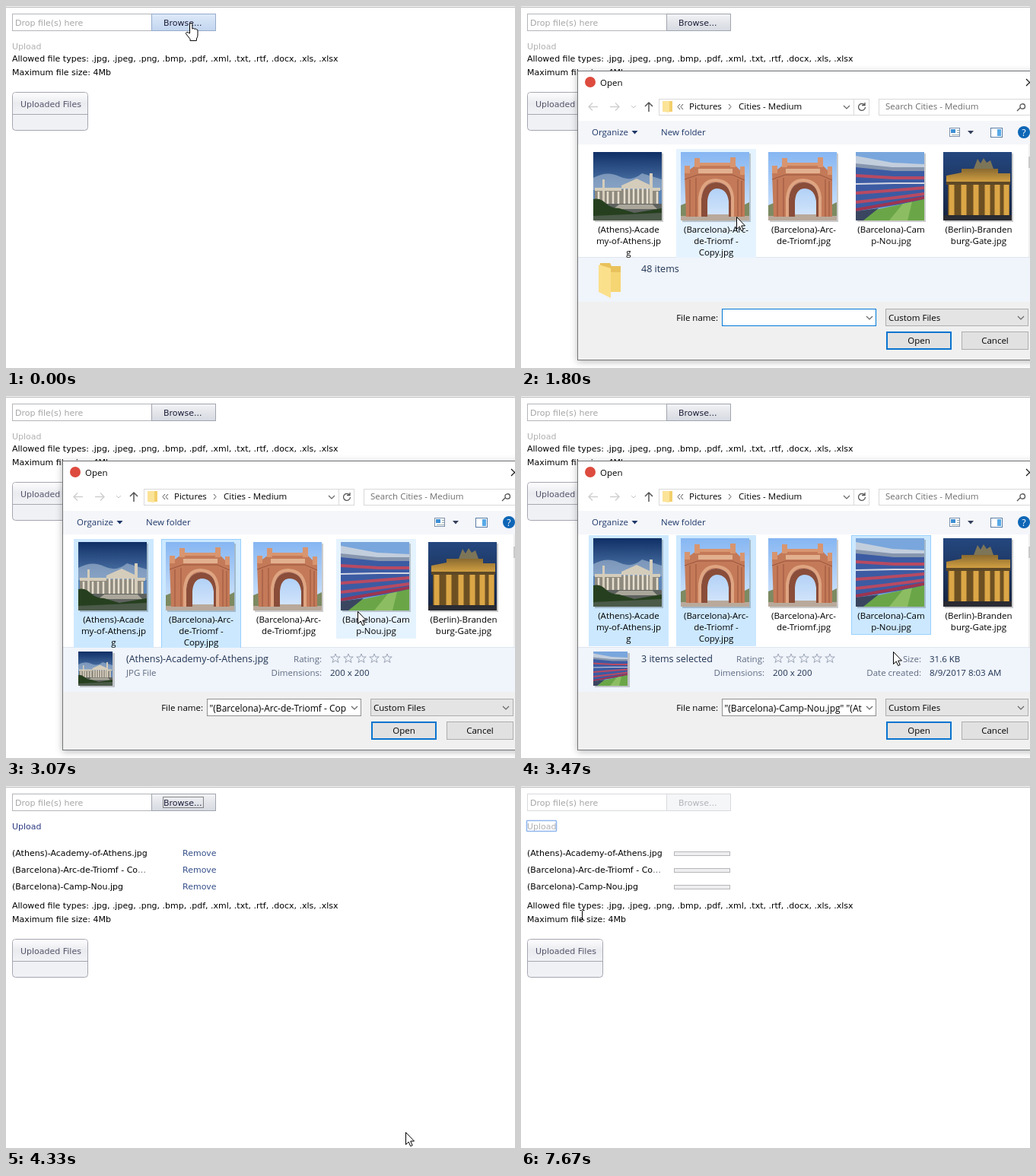
Recreate the animation shown at these times as an HTML page. Size 669 by 476 pixels, loop 8 s.

```html
<!DOCTYPE html>
<html lang="en">
<head>
<meta charset="utf-8">
<title>File upload</title>
<style>
  html, body { margin: 0; width: 100%; height: 100%; overflow: hidden; background: #fff; }
  svg { display: block; }
  text { font: 11px "DejaVu Sans", Verdana, sans-serif; white-space: pre; }
  .dialog text { font: 11.5px "Open Sans", "Segoe UI", sans-serif; }
  .dialog .input { font-size: 12px; }
  .dialog .big { font-size: 12.5px; }
  .mid { text-anchor: middle; }
  .end { text-anchor: end; }
</style>
</head>
<body>
<svg width="669" height="476" viewBox="0 0 669 476">
  <defs>
    <linearGradient id="normal" x2="0" y2="1"><stop stop-color="#f3f4f7"/><stop offset=".5" stop-color="#e3e5ea"/><stop offset="1" stop-color="#d7dae1"/></linearGradient>
    <linearGradient id="hover" x2="0" y2="1"><stop stop-color="#dfeafa"/><stop offset=".5" stop-color="#cfdff4"/><stop offset="1" stop-color="#c3d6f0"/></linearGradient>
    <linearGradient id="header" x2="0" y2="1"><stop stop-color="#fdfdfe"/><stop offset=".5" stop-color="#eaebef"/><stop offset="1" stop-color="#f1f2f5"/></linearGradient>
    <linearGradient id="deepSky" x2="0" y2="1"><stop stop-color="#0f2f66"/><stop offset=".6" stop-color="#5d86b8"/></linearGradient>
    <linearGradient id="daySky" x2="0" y2="1"><stop stop-color="#86b6f2"/><stop offset="1" stop-color="#d8e8fb"/></linearGradient>
    <linearGradient id="duskSky" x2="0" y2="1"><stop stop-color="#24477f"/><stop offset="1" stop-color="#16233f"/></linearGradient>
    <linearGradient id="gold" x2="0" y2="1"><stop stop-color="#8a6a30"/><stop offset="1" stop-color="#d9a544"/></linearGradient>
    <clipPath id="list"><path d="M76 182H669V331H76Z"/></clipPath>
    <clipPath id="square"><path d="M0 0H90V90H0Z"/></clipPath>

    <g id="photo0" clip-path="url(#square)">
      <path fill="url(#deepSky)" d="M0 0H90V90H0Z"/>
      <path fill="#a9bdd4" d="M0 34Q18 24 34 32T64 28L90 36V50H0Z" opacity=".6"/>
      <path fill="#8f8a7e" d="M2 49H86V70H2Z"/>
      <path fill="#d5cdbb" d="M37 44 57 35 76 44V48H37ZM2 47H37V51H2ZM76 47H88V51H76ZM74 28H78V68H74ZM12 36H15V68H12Z"/>
      <path stroke="#e6dfcf" stroke-width="2.500" d="M7 52V68M19 52V68M26 52V68M33 52V68M41 48V69M47 48V69M53 48V69M59 48V69M65 48V69M71 48V69M84 52V68"/>
      <path fill="#5e625f" d="M0 68H90V90H0Z"/>
      <path fill="#aaa69a" d="M34 69H78L84 75H26Z"/>
      <path fill="#26401f" d="M0 62Q9 60 16 67T34 74L54 80 90 74V90H0Z"/>
      <path fill="#4b5a49" d="M0 84 90 80V90H0Z"/>
    </g>
    <g id="photo1" clip-path="url(#square)">
      <path fill="url(#daySky)" d="M0 0H90V90H0Z"/>
      <path fill="#b9a99b" d="M0 82H90V90H0Z"/>
      <path fill="#7d8a62" d="M0 70 10 66V84H0ZM82 70 90 66V84H82Z"/>
      <path fill="#c47a58" d="M5 28 20 17 70 16 84 30V85H67V62Q64 40 46 40 29 41 27 62V85H7Z"/>
      <path fill="#d8956f" d="M5 18H12V28H5ZM18 8H25V20H18ZM65 7H72V20H65ZM78 19H84V30H78ZM20 14H70V18H20Z"/>
      <path fill="#8a4d39" d="M27 85V62Q29 41 46 40 64 40 67 62V85H63V65Q61 48 47 48 36 49 35 65V85Z"/>
      <path fill="none" stroke="#dfa582" stroke-width="4" d="M25 85V60Q28 37 46 37 66 38 68 60V85"/>
      <path fill="none" stroke="#99553f" d="M5 36 22 30H68L84 37M12 36V85M20 34V85M75 36V85M80 38V85"/>
      <path fill="#e2b08f" d="M23 22H68V28H23Z"/>
    </g>
    <use id="photo2" href="#photo1"/>
    <g id="photo3" clip-path="url(#square)">
      <path fill="#79a6dc" d="M0 0H90V90H0Z"/>
      <path fill="#c3cedd" d="M0 5 48 14 90 16V24H0Z"/>
      <path fill="#8796ae" d="M0 15 48 20 90 20V26H0Z"/>
      <path fill="#3c5ba3" d="M0 20 50 25 90 25V64L0 78Z"/>
      <path fill="none" stroke="#b84a62" stroke-width="4" d="M0 31 50 34H90M0 54Q46 51 90 47M0 66Q46 61 90 55"/>
      <path fill="none" stroke="#d5d6e2" stroke-width="2" d="M0 42 50 41H90"/>
      <path fill="none" stroke="#9d3551" stroke-width="4" d="M0 76Q46 68 90 60"/>
      <path fill="#6aa648" d="M8 90 26 76 90 62V90Z"/>
      <path fill="#8dbd62" d="M44 90 62 68 74 65.500 68 90Z"/>
      <path fill="#3a4660" d="M0 78 30 74 10 90H0Z"/>
    </g>
    <g id="photo4" clip-path="url(#square)">
      <path fill="url(#duskSky)" d="M0 0H90V90H0Z"/>
      <path fill="#7d7558" d="M40 22 45 9 49 15 53 8 57 14 62 11 66 22Z"/>
      <path fill="url(#gold)" d="M24 22H72V28H88V41H4V31L24 27Z"/>
      <path fill="#5d4826" d="M4 39H88V43H4Z"/>
      <path fill="#6d5022" d="M6 43H87V84H6Z"/>
      <path stroke="#dba646" stroke-width="7" d="M11 43V85M27 43V85M43 43V85M58 43V85M71 43V85M83 43V85"/>
      <path fill="#2a2b33" d="M0 83H90V90H0Z"/>
    </g>
    <g id="folder">
      <path fill="#e9c25c" d="M2 0H15L17 4H29V38H2Z"/>
      <path fill="#fbe08c" d="M0 2 16 7V46L0 38Z"/>
      <path fill="#f6d573" d="M16 12H29V38H16Z"/>
    </g>
    <path id="star" fill="none" stroke="#9ba5b4" d="M0-6 1.6-2H6.2L2.6 1 4 5.4 0 2.8-4 5.4-2.6 1-6.2-2H-1.6Z"/>
    <path id="arrow" fill="#fff" stroke="#000" d="M.5.5V16.5L4.2 13 6.7 18.6 9.2 17.5 6.7 12H11.5Z"/>
    <path id="hand" fill="#fff" stroke="#000" d="M-1.5 13V1.2a1.7 1.7 0 0 1 3.4 0V7q1.6-1.2 3 .3 1.6-.9 2.6.6 1.5-.3 1.5 2V15q0 3-1.6 5V22.6H-1V20.5L-6.3 13.8q-.6-2 .8-2.3Q-4 11-1.5 13Z"/>
    <path id="ibeam" fill="none" stroke="#000" d="M-2.5-6.5H-.5L.5-5.5 1.5-6.5H3.5M.5-5.5V5.5M-2.5 6.5H-.5L.5 5.5 1.5 6.5H3.5"/>
  </defs>
  <g id="scene"></g>
</svg>
<script>
const LOOP = 8000, TICK = 1000 / 15;
const scene = document.getElementById('scene');

const text = (x, y, s, fill = '#000', cls = '') =>
  `<text x="${x}" y="${y}" fill="${fill}" class="${cls}">${s}</text>`;
const box = (x, y, w, h, fill, stroke, extra = '') => stroke
  ? `<rect x="${x + .5}" y="${y + .5}" width="${w - 1}" height="${h - 1}" fill="${fill}" stroke="${stroke}" ${extra}/>`
  : `<rect x="${x}" y="${y}" width="${w}" height="${h}" fill="${fill}" ${extra}/>`;
const line = (d, stroke = '#555', width = 1) =>
  `<path d="${d}" fill="none" stroke="${stroke}" stroke-width="${width}"/>`;
const shape = (d, fill) => `<path d="${d}" fill="${fill}"/>`;
const use = (id, x, y, scale = 1) =>
  `<use href="#${id}" transform="translate(${x} ${y}) scale(${scale})"/>`;
const chevron = (x, y) => line(`M${x - 4} ${y - 2}l4 4 4-4`, '#666', 1.2);

// Pointer path: tick, x, y; eased between points
const pointerPath = [
  [0, 243, 23], [15, 243, 23], [16, 246, 27], [20, 246, 27], [27, 283, 277], [28, 283, 277],
  [33, 150, 262], [37, 150, 262], [41, 255, 270], [43, 255, 270], [46, 462, 283], [50, 468, 276],
  [55, 529, 447], [58, 529, 447], [62, 529, 452], [65, 525, 455], [68, 525, 455], [74, 506, 441],
  [96, 506, 441], [107, 22, 59], [111, 22, 59], [115, 80, 170], [120, 80, 170]
];
function pointerAt(k) {
  const i = pointerPath.findIndex(p => p[0] > k);
  const [k0, x0, y0] = pointerPath[i - 1], [k1, x1, y1] = pointerPath[i];
  const u = (k - k0) / (k1 - k0), e = u * u * (3 - 2 * u);
  return [Math.round(x0 + (x1 - x0) * e), Math.round(y0 + (y1 - y0) * e)];
}
function pointer(k, [x, y]) {
  const kind = k < 16 || (k >= 106 && k < 112) ? 'hand' : k >= 114 ? 'ibeam' : 'arrow';
  return use(kind, x, y);
}

function page(k) {
  const chosen = k >= 65, busy = k >= 112, dy = chosen ? 88 : 0;
  const button = busy ? '#f5f6f8' : k < 13 ? 'url(#hover)' : k < 14 ? '#bccfe9' : 'url(#normal)';
  const edge = busy ? '#d9dadd' : k < 14 ? '#95abcb' : '#a0a4ad';
  let s = box(0, 1, 669, 1, '#b2b2b2')
    + box(8, 10, 184, 23, '#fff', busy ? '#d9dadd' : '#b4b5ba')
    + text(12, 26, 'Drop file(s) here', '#a6a6a8')
    + box(191, 10, 85, 23, button, edge)
    + text(207, 26, 'Browse...', busy ? '#b3b3b8' : '#1d1d38')
    + text(8, 57, 'Upload', chosen && !busy ? '#2c3a80' : '#b0b0b3');
  if (chosen && k < 107) s += box(206, 14, 54, 15, 'none', '#222', 'stroke-dasharray="1 1"');
  if (k >= 109) s += box(7, 45, 40, 15, 'none', '#8fb6ee', 'rx="1" stroke-width="1.6"');
  if (chosen) ['(Athens)-Academy-of-Athens.jpg', '(Barcelona)-Arc-de-Triomf - Co<tspan fill="#667">…</tspan>', '(Barcelona)-Camp-Nou.jpg']
    .forEach((name, i) => {
      const y = 92 + 22 * i;
      s += text(8, y, name)
        + (busy ? box(201, y - 6, 74, 6, '#eeeef0', '#b7b7bb') : text(232, y, 'Remove', '#36508a'));
    });
  return s + text(8, 73 + dy, 'Allowed file types: .jpg, .jpeg, .png, .bmp, .pdf, .xml, .txt, .rtf, .docx, .xls, .xlsx')
    + text(8, 91 + dy, 'Maximum file size: 4Mb')
    + `<g transform="translate(0 ${dy})">`
    + box(8, 113, 100, 51, '#f0f1f5', '#a5a6b0', 'rx="4"')
    + shape('M9 142V118Q9 114 13 114H103Q107 114 107 118V142Z', 'url(#header)')
    + box(9, 142, 98, 1, '#a5a6b0')
    + text(19, 133, 'Uploaded Files', '#55556c') + '</g>';
}

function tooltip(k) {
  const opacity = Math.max(0, Math.min(1, (k - 2) / 3, (12 - k) / 3));
  return `<g class="dialog" opacity="${opacity}">${box(241, 47, 93, 24, '#fff', '#8a8a8a')}`
    + text(287.5, 63, 'No file chosen', '#575757', 'mid') + '</g>';
}

const frame = box(74, 85, 607, 381, '#fff', '#747678', 'style="filter:drop-shadow(0 2px 5px #0004)"')
  + '<circle cx="91" cy="100" r="7" fill="#dd4b3e"/>'
  + text(104, 105, 'Open') + line('M664 96l9 9m0-9l-9 9', '#111', 1.2)
  + line('M101 132.5H89m5-5l-5 5 5 5M117 132.5H129m-5-5l5 5-5 5', '#cfcfcf', 1.4)
  + line('M145 131l3 3 3-3', '#c4c4c4') + line('M168 139V127m-5 5l5-5 5 5', '#555', 1.5)
  + box(181, 122, 277, 22, '#fff', '#d9d9d9') + box(437, 123, 1, 20, '#d9d9d9')
  + shape('M186 125h13v14h-13z', '#f3cf6b') + shape('M186 125h9v15l-9-1z', '#fbe398')
  + line('M209 129l-3 3.5 3 3.5m4-7l-3 3.5 3 3.5') + text(221, 136, 'Pictures')
  + line('M273 129l3 3.5-3 3.5') + text(286, 136, 'Cities - Medium')
  + chevron(428, 133) + line('M451.5 130a4.5 4.5 0 1 0 1 3M452 127v3.5h-4', '#555', 1.3)
  + box(470, 122, 212, 22, '#fff', '#d9d9d9') + text(479, 136, 'Search Cities - Medium', '#6e6e6e')
  + line('M652 138l4-4m0-1.5a3.2 3.2 0 1 0 6.4-1a3.2 3.2 0 1 0-6.4 1', '#555', 1.3)
  + box(75, 151, 594, 31, '#f5f6fa')
  + text(93, 170, 'Organize', '#1d3768') + shape('M145.5 164h8l-4 4.5z', '#1d3768')
  + text(184, 170, 'New folder', '#1d3768')
  + box(563, 160, 14, 12, '#fff', '#7c90ab') + box(565, 162, 6, 5, '#3d8fd6') + line('M573 163.5h3M573 166.5h3M566 169.5h10', '#9aa')
  + shape('M587 164h8l-4 4.5z', '#333e5a')
  + box(617, 160, 16, 13, '#fff', '#5b7da5') + box(626, 162, 5, 9, '#57a9e6')
  + '<circle cx="661" cy="166" r="8" fill="#0e66b6"/>'
  + text(661, 171, '?', '#fff', 'mid big')
  + box(667, 182, 2, 149, '#f0f0f0') + box(667, 198, 2, 15, '#c9c9c9')
  + box(75, 331, 594, 58, '#f0f4fb') + box(75, 330, 594, 1, '#dfe5ee')
  + box(75, 389, 594, 76, '#f0f0f0')
  + text(259, 414, 'File name:', '#000', 'end')
  + box(479, 398, 188, 23, '#e4e4e4', '#adadad') + text(483, 414, 'Custom Files') + chevron(657, 410)
  + box(579, 428, 88, 24, '#e1e1e1', '#adadad') + text(623, 444, 'Cancel', '#000', 'mid');

const labels = [
  ['(Athens)-Acade', 'my-of-Athens.jp', 'g'],
  ['(Barcelona)-Arc-', 'de-Triomf -', 'Copy.jpg'],
  ['(Barcelona)-Arc-', 'de-Triomf.jpg'],
  ['(Barcelona)-Cam', 'p-Nou.jpg'],
  ['(Berlin)-Branden', 'burg-Gate.jpg']
];
const selectedAt = [37, 43, Infinity, 49, Infinity];
const inactiveAt = 60;

function fileList(k, [px, py]) {
  const scroll = (k >= 38 && k < 43) || k >= 49 ? 5 : 0;
  const last = selectedAt.reduce((m, at) => at <= k ? Math.max(m, at) : m, 0);
  const over = py > 187 && py < 331 ? Math.floor((px - 89) / 115) : -1;
  return `<g clip-path="url(#list)"><g transform="translate(0 ${-scroll})">` + labels.map((rows, i) => {
    const x = 89 + 115 * i, height = 101 + 15 * rows.length, selected = k >= selectedAt[i];
    let s = '';
    if (selected && k >= inactiveAt) s = box(x, 188, 105, height, '#d9d9d9');
    else if (selected) s = box(x, 188, 105, height, '#cce8ff', selectedAt[i] === last ? '#99d1ff' : '');
    else if (i === over) s = box(x, 188, 105, height, '#e5f3ff');
    return s + box(x + 8, 194, 90, 90, '#0003') + use('photo' + i, x + 6, 192)
      + rows.map((row, j) => text(x + 52.5, 298 + 15 * j, row, '#000', 'mid')).join('');
  }).join('') + '</g></g>';
}

function details(k) {
  const ink = '#1e3352', soft = '#5d6b82';
  if (k < 38) return use('folder', 102, 338) + text(158, 350, '48 items', ink, 'big');
  const many = k >= 50, right = many ? 320 : 415;
  const field = (x, y, name, value) => text(x, y, name, soft, 'end') + text(x + 11, y, value, ink);
  let s = box(97, 338, 46, 45, '#0003') + use(many ? 'photo3' : 'photo0', 95, 336, .5)
    + text(158, 350, many ? '3 items selected' : '(Athens)-Academy-of-Athens.jpg', ink, 'big')
    + field(right, 350, 'Rating:', '') + field(right, 368, 'Dimensions:', '200 x 200');
  for (let i = 0; i < 5; i++) s += use('star', right + 18 + 17 * i, 345);
  return s + (many
    ? field(526, 350, 'Size:', '31.6 KB') + field(526, 368, 'Date created:', '8/9/2017 8:03 AM')
    : text(158, 368, 'JPG File', soft));
}

function openButton(hot) {
  const face = hot
    ? box(480, 428, 86, 24, '#d9e8f7', '#0a6cc4')
    : box(480.5, 428.5, 85, 23, '#e1e1e1', '#0a74cf', 'stroke-width="2"');
  return face + text(523, 444, 'Open', '#000', 'mid');
}

function dialog(k, at) {
  if (k < 16 || k >= 65) return '';
  const opacity = k < 18 ? [.45, .8][k - 16] : k > 62 ? [.6, .25][k - 63] : 1;
  const scale = 1 - (1 - opacity) * .0675;
  const name = k < 37 ? '' : k < 43 ? '(Athens)-Academy-of-Athens.jpg'
    : k < 49 ? '"(Barcelona)-Arc-de-Triomf - Cop' : '"(Barcelona)-Camp-Nou.jpg" "(At';
  const caret = k < 37 && Math.floor((k - 16) / 8) % 2 === 0;
  return `<g class="dialog" opacity="${opacity}" transform="translate(345 275) scale(${scale}) translate(-345 -275)">`
    + frame + fileList(k, at) + details(k)
    + box(264, 398, 203, 23, '#fff', k < 37 ? '#0078d7' : '#8f8f8f') + chevron(458, 410)
    + text(267.5, 414.5, name, '#000', 'input') + (caret ? box(268, 402, 1, 15, '#000') : '')
    + openButton(at[0] > 480 && at[1] > 428) + '</g>';
}

let shown = -1;
function draw(now) {
  const k = Math.floor((now % LOOP + 4) / TICK) % 120;
  if (k !== shown) {
    shown = k;
    const at = pointerAt(k);
    scene.innerHTML = page(k) + tooltip(k) + dialog(k, at) + pointer(k, at);
  }
  requestAnimationFrame(() => draw(performance.now()));
}
draw(performance.now());
</script>
</body>
</html>
```
